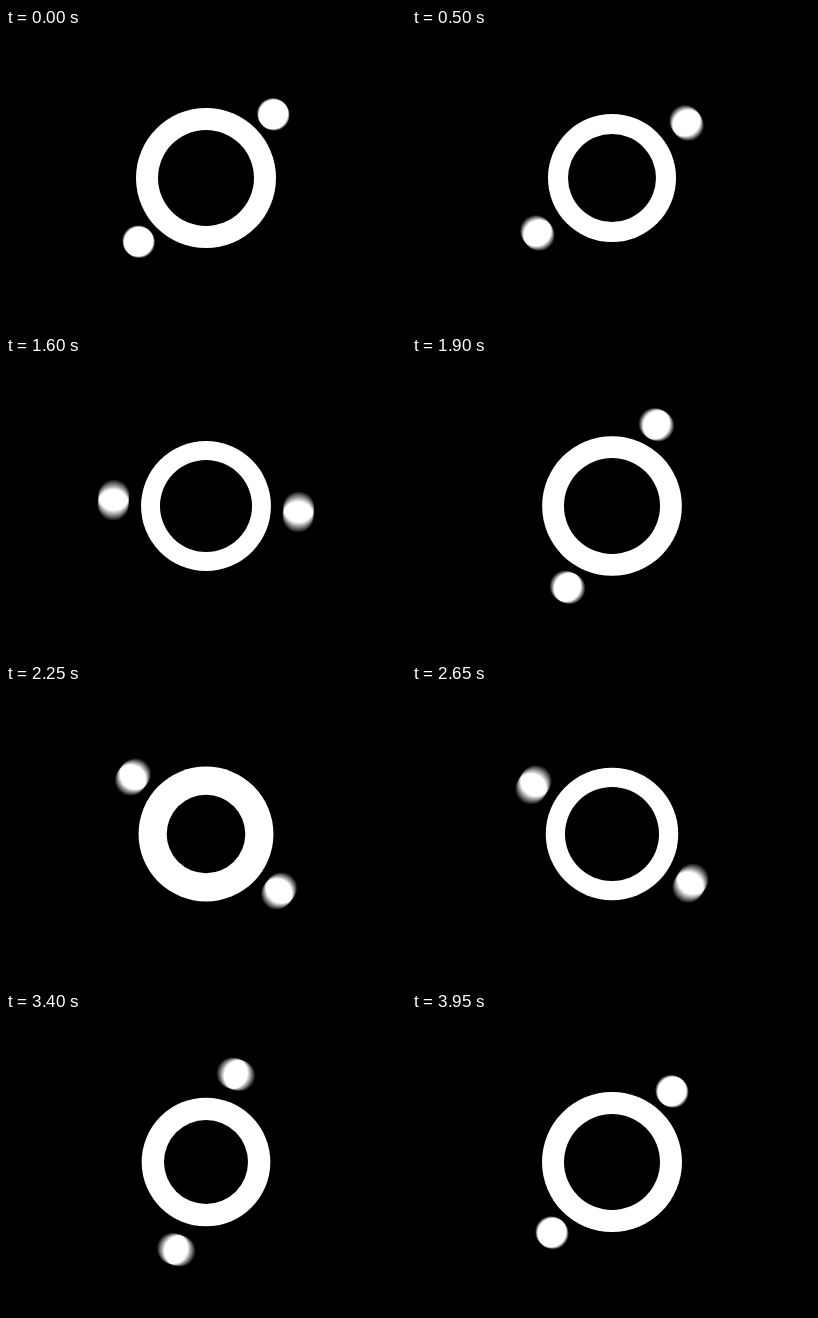
These frames come from a looping animation (400x300 px, 4000 ms). An HTML page with a canvas:

```html
<!DOCTYPE html>
<html>
<head>
<meta charset="utf-8">
<style>
  html, body { margin: 0; width: 100%; height: 100%; overflow: hidden; background: #000; }
  canvas { display: block; }
</style>
</head>
<body>
<canvas id="stage" width="400" height="300"></canvas>
<script>
const ctx = document.getElementById('stage').getContext('2d');
const TURN = 1000, START = -43.5, ORBIT = 92.7, DOT = 15.5;
const SHUTTER = 0.0125, SAMPLES = 16;
const rad = Math.PI / 180;

// One turn: [time in turns, angle in degrees, inner radius of the ring]
const keys = [
  [0, 0, 48], [0.05, 6.8, 47.5], [0.25, 81, 39.3], [0.4, 151.9, 42],
  [0.6, 226.6, 46], [0.65, 255.1, 47], [0.85, 327, 48], [0.95, 353.7, 48]
];

// Key i, continued past both ends of the turn
function key(i) {
  const n = keys.length, turn = Math.floor(i / n);
  const [t, angle, inner] = keys[i - turn * n];
  return [t + turn, angle + 360 * turn, inner];
}

function slope(i, c) {
  const [a, b, d] = [key(i - 1), key(i), key(i + 1)];
  const h0 = b[0] - a[0], h1 = d[0] - b[0];
  return ((b[c] - a[c]) / h0 * h1 + (d[c] - b[c]) / h1 * h0) / (h0 + h1);
}

// Smooth curve through column c of the keys
function curve(t, c) {
  const turn = Math.floor(t), p = t - turn;
  let i = keys.length - 1;
  while (keys[i][0] > p) i--;
  const a = key(i), b = key(i + 1), h = b[0] - a[0], u = (p - a[0]) / h;
  const v = 1 - u;
  const value = v * v * ((1 + 2 * u) * a[c] + u * h * slope(i, c))
              + u * u * ((1 + 2 * v) * b[c] - v * h * slope(i + 1, c));
  return c === 1 ? value + 360 * turn : value;
}

function disc(x, y, r, color) {
  ctx.fillStyle = color;
  ctx.beginPath();
  ctx.arc(x, y, r, 0, 2 * Math.PI);
  ctx.fill();
}

function draw(ms) {
  const t = ms % 4000 / TURN;
  ctx.globalCompositeOperation = 'source-over';
  ctx.globalAlpha = 1;
  ctx.fillStyle = '#000';
  ctx.fillRect(0, 0, 400, 300);
  disc(200, 150, 67 + 3 * Math.cos(curve(t, 1) * rad), '#fff');
  disc(200, 150, curve(t, 2), '#000');

  // Motion blur: add up the dots over a short exposure
  ctx.globalCompositeOperation = 'lighter';
  ctx.globalAlpha = 1 / SAMPLES;
  for (let i = 0; i < SAMPLES; i++) {
    const moment = t + ((i + 0.5) / SAMPLES - 0.5) * SHUTTER;
    const angle = (START + curve(moment, 1)) * rad;
    const x = ORBIT * Math.cos(angle), y = ORBIT * Math.sin(angle);
    disc(200 + x, 150 + y, DOT, '#fff');
    disc(200 - x, 150 - y, DOT, '#fff');
  }
}

const begin = performance.now();
function frame() {
  draw(performance.now() - begin);
  requestAnimationFrame(frame);
}
frame();
</script>
</body>
</html>
```
